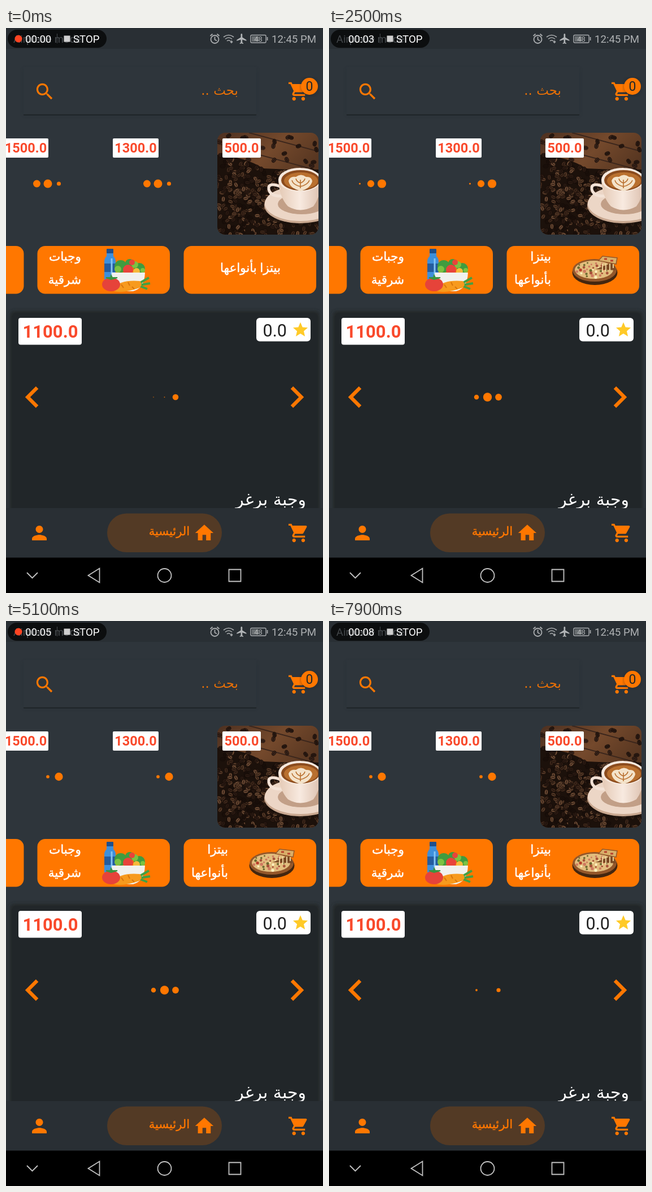
Write an HTML page that moves like this. It is 561x998 px and loops after 8 s.

```html
<!DOCTYPE html>
<html lang="ar">
<head>
<meta charset="utf-8">
<title>Food ordering home screen</title>
<style>
  html, body { margin: 0; width: 100%; height: 100%; overflow: hidden; background: #2e353b; }
  svg { display: block; width: 100vw; height: 100vh; }
  text { font-family: Roboto, Inter, sans-serif; }
  .ar { font-family: "DejaVu Sans", "Noto Sans", sans-serif; direction: rtl; }
  .cat { font-size: 21.5px; fill: #fff; stroke: #fff; stroke-width: .5; }
  .price { font-weight: 700; fill: #f9492b; text-anchor: middle; }
  .orange { fill: #ff7700; }
  .line { fill: none; stroke-linecap: butt; }
</style>
</head>
<body>
<svg viewBox="0 0 561 998" preserveAspectRatio="none">
  <defs>
    <path id="cart" d="M7 18c-1.1 0-1.99.9-1.99 2S5.9 22 7 22s2-.9 2-2-.9-2-2-2zM1 2v2h2l3.6 7.59-1.35 2.45c-.16.28-.25.61-.25.96 0 1.1.9 2 2 2h12v-2H7.42c-.14 0-.25-.11-.25-.25l.03-.12.9-1.63h7.45c.75 0 1.41-.41 1.75-1.03l3.58-6.49c.08-.14.12-.31.12-.48 0-.55-.45-1-1-1H5.21l-.94-2H1zm16 16c-1.1 0-1.99.9-1.99 2s.89 2 1.99 2 2-.9 2-2-.9-2-2-2z"/>
    <clipPath id="photoClip"><rect x="374" y="185" width="179" height="180" rx="14"/></clipPath>
    <clipPath id="bodyClip"><rect y="480" width="561" height="368"/></clipPath>
    <filter id="soft" x="-10%" y="-10%" width="120%" height="120%"><feGaussianBlur stdDeviation="3"/></filter>
    <linearGradient id="wood" x1="0" y1="0" x2="1" y2="1">
      <stop offset="0" stop-color="#4d3020"/><stop offset=".35" stop-color="#74492c"/><stop offset=".6" stop-color="#5a3822"/><stop offset="1" stop-color="#38231a"/>
    </linearGradient>
    <linearGradient id="china"><stop offset="0" stop-color="#e4c9b4"/><stop offset=".5" stop-color="#f8eae0"/><stop offset="1" stop-color="#dcc0ae"/></linearGradient>
  </defs>
  <rect width="561" height="998" fill="#2e353b"/>

  <!-- status bar -->
  <rect width="561" height="37" fill="#292f34"/>
  <g fill="none" stroke="#a9acae" stroke-width="1.8">
    <circle cx="369.5" cy="20" r="7"/>
    <path d="M369.5 15.5V20.5l3.5 2M361.5 14l4-3.5M377.5 14l-4-3.5"/>
    <path d="M385 16q9-7 18 0M388 19.500q6-5 12 0M391 23q3-2.500 6 0M397 25l2-2 2 2M397 24l2 2 2-2" stroke-width="1.6"/>
    <rect x="433" y="12.500" width="27" height="13.500" rx="2" stroke-width="1.400"/>
    <path d="M462.500 16v6"/>
  </g>
  <rect x="435" y="14.500" width="12" height="9.500" fill="#6b7073"/>
  <path transform="translate(406.500 8.300) scale(.9)" fill="#b2b5b7" d="M21 16v-2l-8-5V3.500c0-.83-.67-1.500-1.500-1.500S10 2.670 10 3.500V9l-8 5v2l8-2.500V19l-2 1.500V22l3.500-1 3.500 1v-1.500L13 19v-5.500l8 2.500z"/>
  <text x="446.500" y="24" font-size="13" fill="#b2b5b7" text-anchor="middle">48</text>
  <text x="470" y="26" font-size="18.600" fill="#afb2b4">12:45 PM</text>
  <rect x="3" y="3" width="175" height="32" rx="16" fill="#0c0e0f"/>
  <text x="13" y="26" font-size="18.600" fill="#45494c">Airplane mode</text>
  <path d="M90.500 10v17" stroke="#45494c"/>
  <circle id="rec" cx="22" cy="19" r="6.500" fill="#ff4422"/>
  <text id="clock" x="34" y="26" font-size="18.600" fill="#fff"></text>
  <rect x="102.500" y="13.500" width="11" height="11" fill="#cfcfcf"/>
  <text x="119" y="26" font-size="18.600" fill="#fff">STOP</text>

  <!-- search -->
  <rect x="31" y="72" width="412" height="82" fill="#1f2529" opacity=".3" filter="url(#soft)"/>
  <rect x="31" y="69" width="412" height="84" fill="#2e353b"/>
  <path d="M31 153.500H443" stroke="#1b2023" stroke-width="1.500"/>
  <path class="orange" transform="translate(49 93) scale(1.620)" d="M15.500 14h-.79l-.28-.27C15.410 12.590 16 11.110 16 9.500 16 5.910 13.090 3 9.500 3S3 5.910 3 9.500 5.910 16 9.500 16c1.610 0 3.090-.59 4.230-1.570l.27.28v.79l5 4.990L20.490 19l-4.990-5zm-6 0C7.010 14 5 11.990 5 9.500S7.010 5 9.500 5 14 7.010 14 9.500 11.990 14 9.500 14z"/>
  <text class="ar orange" x="411" y="118" font-size="23" opacity=".9">بحث ..</text>
  <use href="#cart" class="orange" transform="translate(498.400 92.500) scale(1.620)"/>
  <circle cx="537" cy="104" r="15" fill="#171b1e" opacity=".4" filter="url(#soft)"/>
  <circle class="orange" cx="537" cy="103" r="15"/>
  <text x="537" y="111" font-size="23" fill="#20262a" text-anchor="middle">0</text>

  <!-- coffee picture -->
  <g clip-path="url(#photoClip)">
    <rect x="374" y="185" width="179" height="180" fill="url(#wood)"/>
    <path d="M374 204L553 252M430 185L553 218M374 228L480 262" stroke="#3b261c" stroke-width="2"/>
    <path d="M374 224Q425 228 455 248L500 250 553 250V365H374Z" fill="#1c110b"/>
    <g id="beans"></g>
    <ellipse cx="522" cy="320" rx="64" ry="30" fill="#1b100b" opacity=".7"/>
    <ellipse cx="521" cy="313" rx="64" ry="32" fill="#c9a890"/>
    <ellipse cx="521" cy="310" rx="63" ry="31" fill="#ecd6c6"/>
    <ellipse cx="523" cy="311" rx="42" ry="18" fill="#c29f87"/>
    <path d="M488 281Q463 271 465 285 469 300 495 296" fill="none" stroke="#f3e2d6" stroke-width="5"/>
    <path d="M482 267Q483 298 499 315 521 328 544 315 557 298 558 267Z" fill="url(#china)"/>
    <ellipse cx="520" cy="268" rx="38" ry="21" fill="#f6e8dd"/>
    <ellipse cx="521" cy="269" rx="34" ry="18" fill="#8b4b1d"/>
    <ellipse cx="522" cy="270" rx="30" ry="15" fill="#b9702f"/>
    <path d="M521 288Q502 283 500 270 503 261 513 263 522 256 531 263 541 262 542 271 538 284 521 288Z" fill="#f4e3ca"/>
    <path d="M521 283V268M521 280Q508 277 506 269M521 280Q534 277 537 269M521 274Q514 271 513 266M521 274Q528 271 529 266" class="line" stroke="#b9702f" stroke-width="1.600"/>
  </g>

  <!-- small prices -->
  <g fill="#fff">
    <rect x="-8" y="195" width="83" height="34" rx="2"/>
    <rect x="189" y="195" width="81" height="34" rx="2"/>
    <rect x="383" y="195" width="68" height="34" rx="2"/>
  </g>
  <g class="price" font-size="23.500">
    <text x="35" y="220">1500.0</text><text x="229.500" y="220">1300.0</text><text x="417" y="220">500.0</text>
  </g>

  <!-- categories -->
  <g class="orange">
    <rect x="-204" y="385" width="235.500" height="84.500" rx="14"/>
    <rect x="55.500" y="385" width="234.500" height="84.500" rx="14"/>
    <rect x="314.500" y="385" width="234.500" height="84.500" rx="14"/>
  </g>
  <g class="ar cat">
    <text x="133" y="411">وجبات</text><text x="133" y="452">شرقية</text>
    <text id="catWide" x="486" y="431">بيتزا بأنواعها</text>
  </g>
  <g>
    <path d="M178 398h12v5q4 4 4 9v32h-20v-32q0-5 4-9z" fill="#3e8fdb"/>
    <rect x="178" y="390" width="12" height="8" rx="1" fill="#1f4f8c"/>
    <rect x="174" y="416" width="20" height="15" fill="#255c9e"/>
    <path d="M187 407v34" stroke="#83c3f2" stroke-width="3"/>
    <g fill="#3f9c3f">
      <circle cx="203" cy="421" r="11"/><circle cx="219" cy="416" r="8"/><circle cx="236" cy="425" r="10"/>
    </g>
    <g fill="#7cc242"><circle cx="198" cy="426" r="6"/><circle cx="228" cy="418" r="6"/><circle cx="242" cy="428" r="4"/></g>
    <circle cx="216" cy="427" r="9" fill="#e8443b"/><circle cx="223" cy="414" r="5" fill="#e8443b"/>
    <circle cx="231" cy="430" r="6" fill="#f6b93b"/>
    <path d="M187 432H246Q245 460 225 465H205Q189 458 187 432Z" fill="#f1f1ee"/>
    <path d="M234 452L253 441M236 454L255 451M235 455L250 461" stroke="#45a043" stroke-width="4"/>
    <path d="M190 459Q203 444 237 447 243 454 236 459 208 469 191 465Z" fill="#f79a1e"/>
    <path d="M204 453l4 6M216 449l3 6M223 457l4 4" stroke="#d9760d" stroke-width="2"/>
    <ellipse cx="186" cy="453" rx="16" ry="12" fill="#e6433a"/>
    <path d="M186 444l-9-3 8 0 1-4 2 4 9 0z" fill="#3c9440" stroke="#3c9440" stroke-width="2"/>
  </g>
  <g id="pizza">
    <g class="ar cat"><text x="393" y="411">بيتزا</text><text x="393" y="452">بأنواعها</text></g>
    <ellipse cx="470.500" cy="432" rx="40" ry="22" fill="#43260f"/>
    <ellipse cx="470" cy="428" rx="39" ry="20" fill="#94572a"/>
    <ellipse cx="469" cy="427" rx="34" ry="16" fill="#e2bd7e"/>
    <g id="toppings"></g>
    <path d="M472 426L502 414 508 428Z" fill="#7d4b25"/>
    <path d="M484 416v16M490 416v14M497 416v12M503 415v9" stroke="#f3dca4" stroke-width="1.800"/>
    <path d="M477 411L484 403 510 406 508 417Z" fill="#d9ae69" stroke="#94572a" stroke-width="1.500"/>
    <path d="M487 408h5M498 411h5" stroke="#b9412c" stroke-width="3"/>
  </g>

  <!-- meal card -->
  <g clip-path="url(#bodyClip)">
    <rect x="7" y="500" width="548" height="380" rx="8" fill="#202528" filter="url(#soft)"/>
    <rect x="11" y="504" width="540" height="370" rx="6" fill="#212629"/>
    <text class="ar" x="531" y="842.500" font-size="30" fill="#fff">وجبة برغر</text>
  </g>
  <rect x="22" y="512" width="112" height="47.500" rx="4" fill="#fff"/>
  <text class="price" x="78.500" y="547" font-size="31">1100.0</text>
  <rect x="443" y="512" width="96" height="41.500" rx="6" fill="#fff"/>
  <text x="454.500" y="544.500" font-size="30.500" fill="#212121">0.0</text>
  <path transform="translate(505.300 517.200) scale(1.310)" fill="#ffca28" d="M12 17.270L18.180 21l-1.640-7.030L22 9.240l-7.190-.61L12 2 9.190 8.630 2 9.240l5.460 4.730L5.820 21z"/>
  <g class="orange">
    <path transform="translate(8.500 614) scale(3.170)" d="M15.410 7.410L14 6l-6 6 6 6 1.410-1.410L10.830 12z"/>
    <path transform="translate(476.500 614) scale(3.170)" d="M10 6L8.590 7.410 13.170 12l-4.580 4.590L10 18l6-6z"/>
  </g>
  <g id="dots" class="orange"></g>

  <!-- bottom bar -->
  <rect y="848" width="561" height="88" fill="#292f34"/>
  <rect x="179" y="857.500" width="203" height="68.500" rx="34.200" fill="#533a25"/>
  <g class="orange">
    <path transform="translate(39.600 872.500) scale(1.620)" d="M12 12c2.210 0 4-1.790 4-4s-1.790-4-4-4-4 1.790-4 4 1.790 4 4 4zm0 2c-2.670 0-8 1.340-8 4v2h16v-2c0-2.660-5.330-4-8-4z"/>
    <path transform="translate(331.500 872.500) scale(1.620)" d="M10 20v-6h4v6h5v-8h3L12 3 2 12h3v8z"/>
    <use href="#cart" transform="translate(498.400 872.500) scale(1.620)"/>
    <text class="ar" x="325" y="896" font-size="21" stroke="#ff7700" stroke-width=".4">الرئيسية</text>
  </g>

  <!-- system navigation -->
  <rect y="935.500" width="561" height="63" fill="#000"/>
  <g class="line" stroke="#c4c4c4" stroke-width="1.800">
    <path d="M37 962L46.500 971.500 56 962M165.500 954.500V979.500L145.500 967ZM394.500 956.500h21v21h-21z"/>
    <circle cx="280.500" cy="967" r="12"/>
  </g>
</svg>
<script>
const LOOP = 8000, BOUNCE = 1400, SLIDE = 2000;
const DOT_RADIUS = 7.8, DOT_GAP = 19.5;
const PIZZA_LOADED = 800, CLOCK_LEAD = 550;
const $ = id => document.getElementById(id);

function add(parent, tag, attrs) {
  const node = document.createElementNS('http://www.w3.org/2000/svg', tag);
  for (const key in attrs) node.setAttribute(key, attrs[key]);
  parent.append(node);
  return node;
}

let seed = 11;
const random = () => (seed = seed * 16807 % 2147483647) / 2147483647;
const pick = list => list[Math.floor(random() * list.length)];

function scatterBeans() {
  for (let i = 0; i < 620; i++) {
    const x = 374 + random() * 180, y = 188 + random() * 178;
    const edge = 224 + Math.min(30, Math.max(0, x - 395) * .4);
    const loose = y < edge;
    if (loose && random() > .13) continue;
    const turn = `rotate(${random() * 180} ${x} ${y})`;
    const tones = loose ? ['#2b1a12', '#3a241a'] : ['#2b1a12', '#3f281b', '#573a27', '#1a0f0a', '#6d4b34'];
    add($('beans'), 'ellipse', { cx: x, cy: y, rx: 4.6, ry: 3.2, transform: turn,
      fill: pick(tones), stroke: '#140b07', 'stroke-width': .7 });
    add($('beans'), 'path', { d: `M${x - 3} ${y}h6`, transform: turn, stroke: '#160d09', 'stroke-width': .9 });
  }
}

function scatterToppings() {
  for (let i = 0; i < 34; i++) {
    const angle = i * 2.4, reach = Math.sqrt(i / 34);
    add($('toppings'), 'circle', {
      cx: 467 + Math.cos(angle) * 31 * reach, cy: 427 + Math.sin(angle) * 14 * reach,
      r: 1.4 + random() * 1.5, fill: pick(['#b9412c', '#cf7a60', '#6d6a30', '#fff0bd', '#a8523a']) });
  }
}

// Dots run right to left, each a fifth of a cycle behind the previous one.
function makeSpinner(cx, cy) {
  const dots = [1, 0, -1].map(side => add($('dots'), 'circle', { cx: cx + side * DOT_GAP, cy }));
  return phase => dots.forEach((dot, i) => {
    const scale = (Math.sin((phase - i * .2) * 2 * Math.PI) + 1) / 2;
    dot.setAttribute('r', DOT_RADIUS * scale);
  });
}

scatterBeans();
scatterToppings();
const smallSpinners = [makeSpinner(74, 275), makeSpinner(269, 275)];
const cardSpinner = makeSpinner(280.5, 652);

function render(t) {
  smallSpinners.forEach(spin => spin(.513 + t / BOUNCE));
  cardSpinner((t + 1480) % SLIDE / BOUNCE); // restarts with every slide

  const clock = t + CLOCK_LEAD;
  $('clock').textContent = '00:0' + Math.floor(clock / 1000);
  $('rec').style.display = clock % 1000 < 500 ? 'none' : '';

  const loaded = t >= PIZZA_LOADED;
  $('pizza').style.display = loaded ? '' : 'none';
  $('catWide').style.display = loaded ? 'none' : '';
}

const start = performance.now();
function tick() {
  render((performance.now() - start) % LOOP);
  requestAnimationFrame(tick);
}
render(0);
requestAnimationFrame(tick);
</script>
</body>
</html>
```
